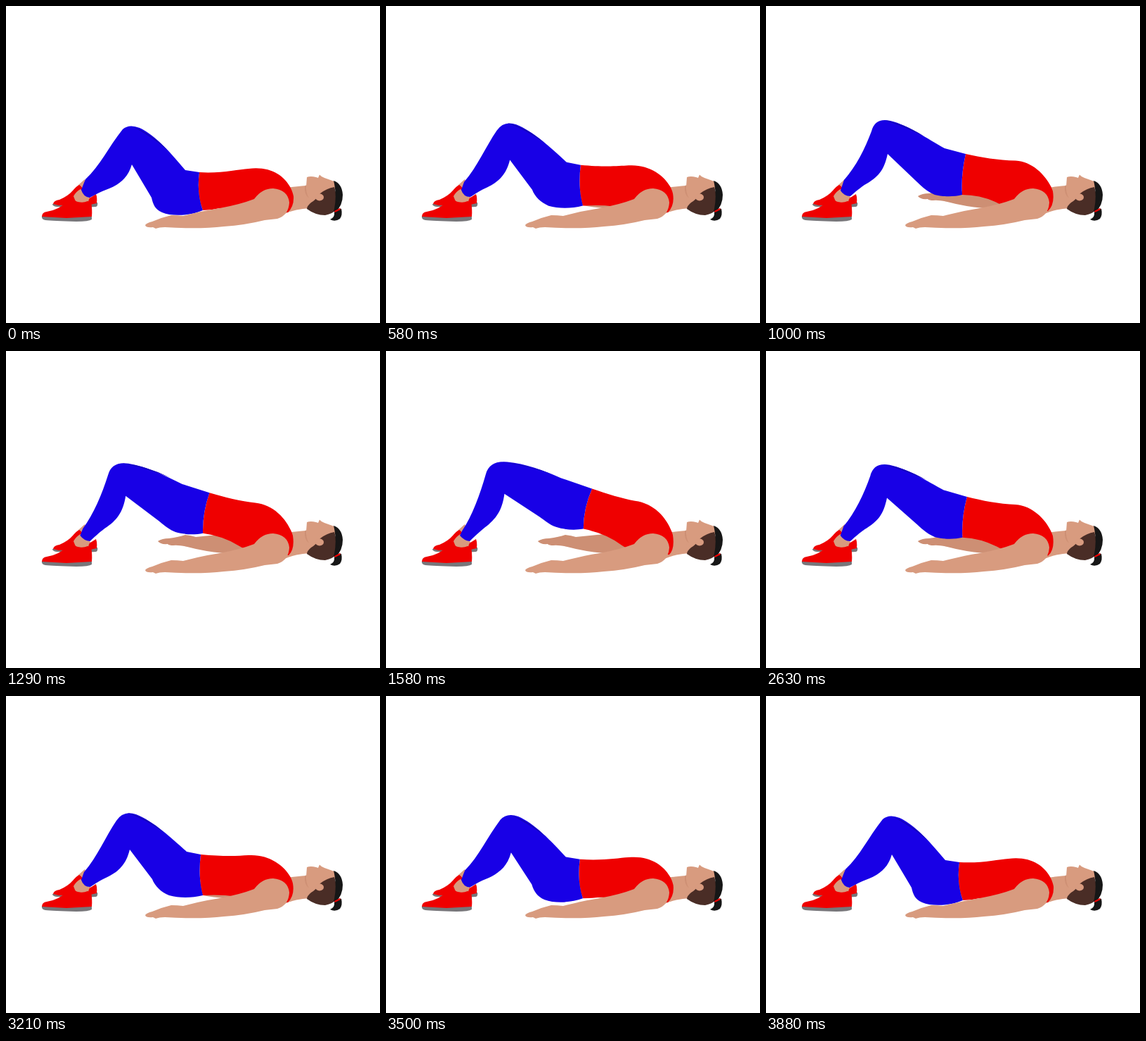
Animation, 532 px wide and 450 px high, one loop 3.92 s. Source, as an HTML page without scripts:

```html
<!DOCTYPE html>
<html lang="en">
<head>
<meta charset="utf-8">
<title>Glute bridge</title>
<style>
html, body { margin: 0; width: 100%; height: 100%; overflow: hidden; background: #fff; }
svg { display: block; width: 532px; height: 450px; }
.skin { fill: #d89b7f; }
.shade { fill: #cd8f74; }
.red { fill: #ef0000; }
.sole { fill: #77767a; }
.hair { fill: #4a2d26; }
.black { fill: #161616; }

/* Each moving part defines four poses, from hips down to hips up. */
.move { d: var(--down); animation: lift 3920ms infinite; }
@keyframes lift {
  0% { d: var(--down); animation-timing-function: cubic-bezier(.333, 0, .667, .397); }
  15.4% { d: var(--low); animation-timing-function: cubic-bezier(.333, .3, .667, .66); }
  25.5% { d: var(--mid); animation-timing-function: cubic-bezier(.333, .555, .667, 1); }
  45.9% { d: var(--up); animation-timing-function: cubic-bezier(.333, 0, .667, .445); }
  69.95% { d: var(--mid); animation-timing-function: cubic-bezier(.333, .34, .667, .7); }
  81.9% { d: var(--low); animation-timing-function: cubic-bezier(.333, .603, .667, 1); }
  100% { d: var(--down); }
}
.pants {
  fill: #1800e6;
  --down: path("M113 246 C133 228 146 200 166 175 Q175 167 190 173 C212 183 235 209 255 233 L275 236 Q271 266 280 290 C262 298 236 299 222 293 C212 289 209 281 207 272 L179 225 C172 250 153 257 137 263 C130 266 125 269 119 272 Q110 271 107 261 Z");
  --low: path("M111 250 C130 228 142 199 157 177 Q167 162 185 168 C210 178 236 202 257 221 L277 225 Q273 257 280 283 C264 287 246 287 232 283 C220 278 212 270 208 260 L176 218 C170 243 156 252 138 260 C130 264 125 268 120 271 Q110 271 107 261 Z");
  --mid: path("M111 247 C128 228 141 202 150 178 Q155 158 177 163 C202 169 230 189 254 202 L284 210 Q277 241 279 268 C268 271 252 271 240 268 C230 264 222 257 214 249 L173 210 C168 233 160 243 140 254 C130 261 125 266 120 270 Q111 270 106 262 Z");
  --up: path("M108 256 C122 235 133 204 141 175 Q146 155 172 157 C198 159 224 168 248 178 L294 194 Q281 222 281 251 C268 253 254 252 242 248 C232 244 228 240 219 234 L168 202 C165 226 156 238 141 250 C131 258 125 264 119 270 Q111 269 105 262 Z");
}
.far-thigh {
  fill: #1400bd;
  --down: path("M180 171 Q208 181 230 205 Q205 184 180 171 Z");
  --low: path("M172 166 Q200 171 225 194 Q198 175 172 166 Z");
  --mid: path("M168 162 Q195 166 225 185 Q195 171 168 162 Z");
  --up: path("M160 157 Q200 159 240 175 Q200 161 160 157 Z");
}
.shirt {
  --down: path("M275 236 C305 238 330 232 345 231 C385 226 405 250 409 270 Q410 284 401 293 L340 290 L304 287 Q292 290 280 290 Q271 266 275 236 Z");
  --low: path("M277 225 C310 228 330 227 345 226 C380 224 404 248 408 266 Q411 283 401 293 L340 286 L312 283 Q296 282 280 283 Q273 257 277 225 Z");
  --mid: path("M284 210 C306 215 330 219 355 219.5 C383 221 403 247 408 263 Q411 282 401 291 L340 285 L326 278 Q304 268 279 268 Q277 241 284 210 Z");
  --up: path("M294 194 C314 201 338 209 354 212 C384 216 402 240 408 261 Q411 281 403 289 L350 284 L337 276 Q314 258 281 251 Q281 222 294 194 Z");
}
</style>
</head>
<body>
<svg viewBox="0 0 532 450">
  <!-- far arm -->
  <path class="shade" d="M216 270 Q222 266 232 266 Q246 264 255 261 Q264 262 270 264 L330 258 L350 284 L310 287 Q280 284 262 279 Q246 275 238 276 Q232 276 230 274 Q220 275 216 270 Z"/>

  <!-- head -->
  <path class="skin" d="M398 258 Q415 256 427 255 L432 287 Q412 288 396 295 Z"/>
  <path class="skin" d="M427 256 L428 243 Q433 241 441 243 L444 244 L446 239.5 Q449 243 453 244 L467 249 Q470 260 466 266 L448 285 L428 288 Z"/>
  <path class="shade" d="M427 254 Q426 265 431 273 Q424 267 425 256 Z"/>
  <path class="hair" d="M467 257 Q456 259 447 266 Q441 275 434 279 Q428 284 428 288 Q440 297 454 297 Q464 295 469 290 Q472 270 467 257 Z"/>
  <ellipse class="skin" cx="446" cy="271.5" rx="6" ry="5"/>
  <path class="black" d="M466 248 Q478 252 479 268 Q479 283 469 292 Q465 293 467 288 Q471 268 466 248 Z"/>
  <path class="black" d="M468 291 Q474 286 477 288 Q479 297 475 302 Q468 307 461 303 Q468 300 467 293 Z"/>
  <path class="red" d="M467 291 L475 287 L476 289 L468 293 Z"/>

  <!-- far foot -->
  <path class="skin" d="M103 254 L112 246 L118 258 L108 263 Z"/>
  <path class="sole" d="M66 281 L130 279 Q131 284 128 285 L110 286 L72 285 Q66 284 66 281 Z"/>
  <path class="red" d="M67 281 Q68 276 76 275 Q88 270 95 262 Q100 256 104 254 Q108 256 110 262 L120 272 L128 267 Q130 272 129 280 L120 282 L75 283 Z"/>

  <!-- near foot -->
  <path class="skin" d="M96 270 Q100 263 106 260 L120 271 Q117 275 117 279 L100 280 Z"/>
  <path class="sole" d="M51 298 Q80 301 122 298 L122 303 Q118 306 100 306 Q66 305 56 304 Q50 303 51 298 Z"/>
  <path class="red" d="M51 299 Q51 293 58 292 Q76 289 86 278 Q92 271 96 268 Q95 276 102 278 Q110 280 116 277 L121 278 Q123 290 122 299 L86 301 Z"/>

  <path class="move shirt red"/>
  <path class="move pants"/>
  <path class="move far-thigh"/>

  <!-- near arm -->
  <path class="skin" d="M198 311 Q200 308 208 306 Q222 300 235 297 Q244 297 252 298 Q278 291 304 287 Q332 282 353 274 Q364 259 380 259 Q401 261 403 279 Q402 297 386 302 Q377 303 368 304 Q340 311 310 313 Q275 317 226 314 Q218 314 213 316 L209 314 Q199 315 198 311 Z"/>
</svg>
</body>
</html>
```
